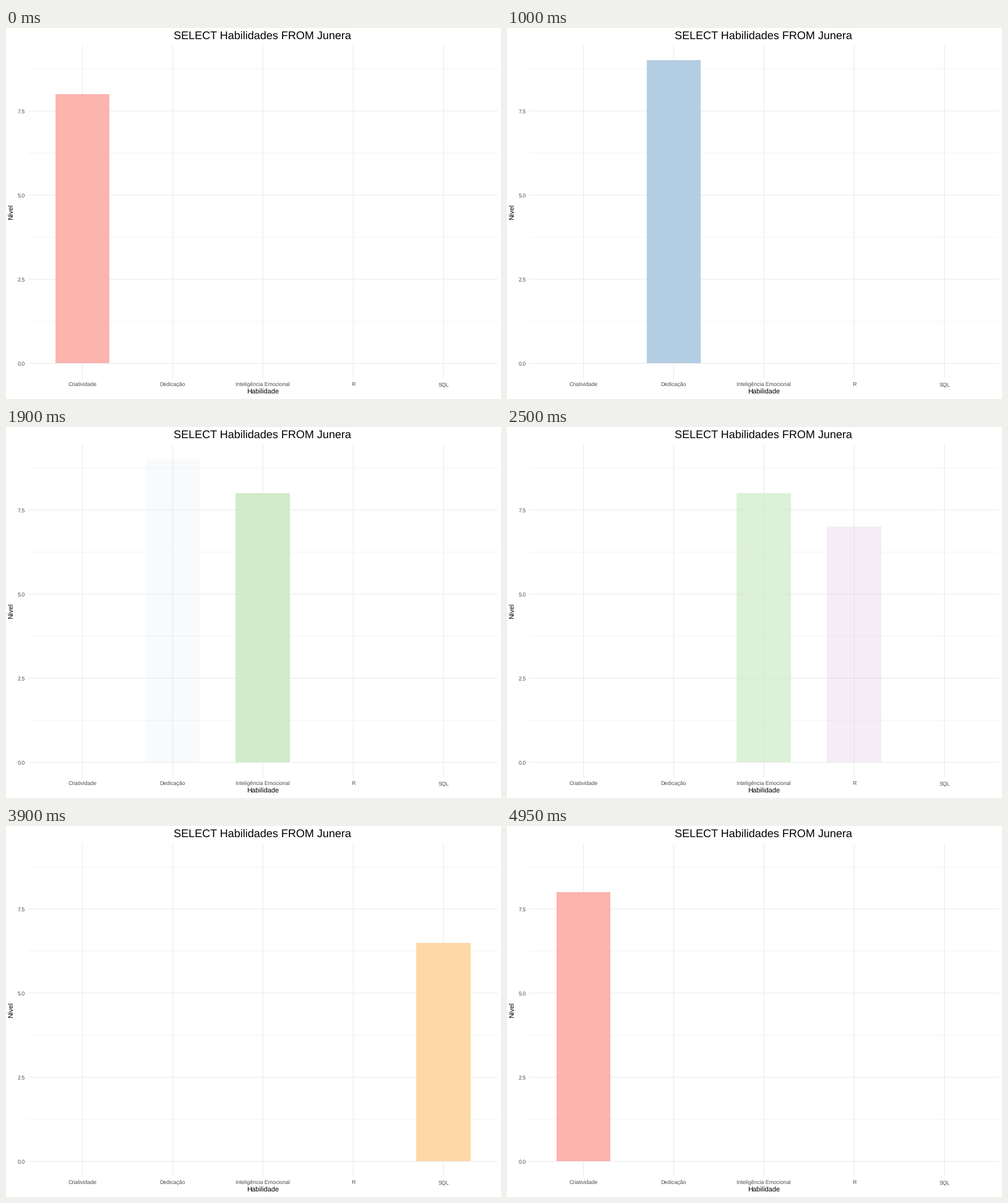
Recreate the animation shown at these times as a matplotlib script. Size 800 px wide and 600 px high, loop 5 s.

```python
import matplotlib.pyplot as plt
from matplotlib.animation import FuncAnimation
from matplotlib.patches import Rectangle

plt.rcParams["font.family"] = "Liberation Sans"
plt.rcParams["text.hinting"] = "none"

W, H, DPI = 800, 600, 100
PX = 72 / DPI  # one pixel in points

# Panel edges and scales, in pixels
LEFT, RIGHT, TOP, BOTTOM = 36.0, 794.5, 27.9, 566.95
STEP = (RIGHT - LEFT) / 5.2
ZERO, UNIT = 542.45, 54.45
MID_X, MID_Y = (LEFT + RIGHT) / 2, (TOP + BOTTOM) / 2

SKILLS = [
    ("Criatividade", 8, "#FBB4AE"),
    ("Dedicação", 9, "#B3CDE3"),
    ("Inteligência Emocional", 8, "#CCEBC5"),
    ("R", 7, "#DECBE4"),
    ("SQL", 6.5, "#FED9A6"),
]

FRAMES, INTERVAL = 100, 50
FADE_STARTS = (7, 27, 46, 66, 86)
FADE_LENGTH = 12


def x_pos(i):
    return LEFT + (0.6 + i) * STEP


def y_pos(value):
    return ZERO - value * UNIT


fig = plt.figure(figsize=(W / DPI, H / DPI), dpi=DPI, facecolor="white")
ax = fig.add_axes([0, 0, 1, 1])
ax.set_xlim(0, W)
ax.set_ylim(H, 0)
ax.axis("off")


def grid_line(xs, ys, width):
    ax.plot(xs, ys, color="#EBEBEB", lw=width * PX, snap=False,
            solid_capstyle="butt", zorder=1)


def label(x, y, text, size, color="black", ha="center", **kw):
    ax.text(x, y, text, fontsize=size * PX, color=color, ha=ha,
            va="baseline", zorder=3, **kw)


def make_bar(i, value, color):
    x0, x1 = round(x_pos(i) - 0.3 * STEP), round(x_pos(i) + 0.3 * STEP)
    y0, y1 = round(y_pos(value)), round(ZERO)
    bar = Rectangle((x0, y0), x1 - x0, y1 - y0, facecolor=color, lw=0,
                    antialiased=False, zorder=2)
    return ax.add_patch(bar)


for value in (1.25, 3.75, 6.25, 8.75):
    grid_line([LEFT, RIGHT], [y_pos(value)] * 2, 0.53)
for value in (0, 2.5, 5, 7.5):
    grid_line([LEFT, RIGHT], [y_pos(value)] * 2, 1.07)
    label(31, y_pos(value) + 3.5, f"{value:.1f}", 8.8, "#4D4D4D", "right")

bars = []
for i, (name, value, color) in enumerate(SKILLS):
    grid_line([x_pos(i)] * 2, [TOP, BOTTOM], 1.07)
    label(x_pos(i), 579, name, 8.8, "#4D4D4D")
    bars.append(make_bar(i, value, color))

label(271.2, 18, "SELECT Habilidades FROM Junera", 18, ha="left")
label(MID_X - 0.3, 592, "Habilidade", 11)
ax.text(13, MID_Y, "Nível", fontsize=11 * PX, rotation=90,
        ha="right", va="center", zorder=3)


def update(frame):
    alphas = [1.0] + [0.0] * (len(bars) - 1)
    # Each fade hands the opacity of one bar to the next
    for i, start in enumerate(FADE_STARTS):
        p = min(max((frame - start) / FADE_LENGTH, 0), 1)
        if p > 0:
            alphas = [0.0] * len(bars)
            alphas[i] = 1 - p
            alphas[(i + 1) % len(bars)] = p
    for bar, alpha in zip(bars, alphas):
        bar.set_alpha(alpha)
    return bars


anim = FuncAnimation(fig, update, frames=FRAMES, interval=INTERVAL,
                     repeat=True, repeat_delay=0, blit=False)
plt.show()
```
